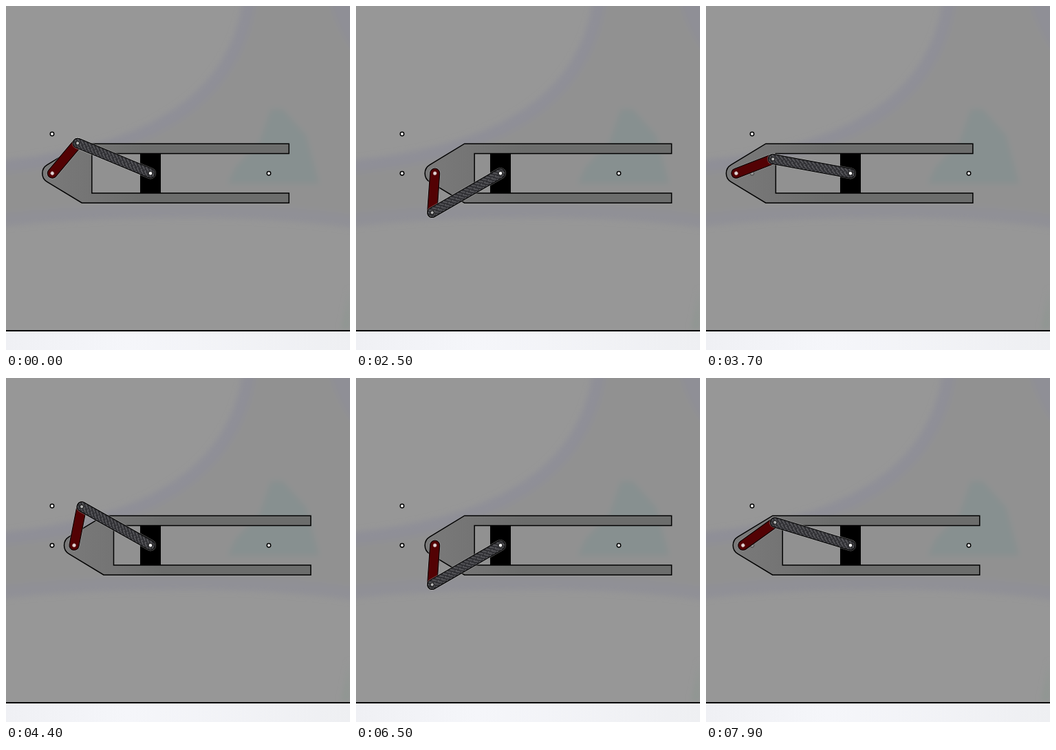
Recreate the animation shown at these times as an HTML page. Size 500 px wide and 500 px high, loop 8 s.

```html
<!DOCTYPE html>
<html lang="en">
<head>
<meta charset="utf-8">
<title>Slider crank</title>
<style>
  html, body { margin: 0; width: 100%; height: 100%; overflow: hidden; background: #979797; }
  svg { display: block; width: 100vw; height: 100vh; }
  .pin { fill: #fff; stroke: #000; stroke-width: 1.5; }
  .halo { fill: #e4e4e4; opacity: .45; }
</style>
</head>
<body>
<svg viewBox="0 0 500 500">
  <defs>
    <filter id="soft" x="-20%" y="-20%" width="140%" height="140%"><feGaussianBlur stdDeviation="4"/></filter>
    <linearGradient id="metal" gradientUnits="userSpaceOnUse" x1="-15" y1="0" x2="130" y2="0">
      <stop offset="0" stop-color="#7a7a7a"/>
      <stop offset=".5" stop-color="#747474"/>
      <stop offset="1" stop-color="#6c6d6c"/>
    </linearGradient>
    <linearGradient id="floor">
      <stop offset="0" stop-color="#eff0f4"/>
      <stop offset=".35" stop-color="#f5f6fa"/>
      <stop offset="1" stop-color="#eeeff2"/>
    </linearGradient>
    <pattern id="weave" width="6" height="6" patternUnits="userSpaceOnUse">
      <rect width="6" height="6" fill="#2f2f33"/>
      <path d="M0 2L2.5 4.5M3.5 0L6 2.5M3.5 5.5H5.5" stroke="#68686c" stroke-width="1.1"/>
    </pattern>
  </defs>

  <rect width="500" height="500" fill="#979797"/>
  <g filter="url(#soft)">
    <path d="M348 -20C335 110 240 208 -20 227V322C150 304 350 300 520 325V-20Z" fill="#919191"/>
    <path d="M355 -20C341 114 244 212 -20 235" fill="none" stroke="#8f8f97" stroke-width="19"/>
    <path d="M-20 313C120 295 380 291 520 316" fill="none" stroke="#909096" stroke-width="19"/>
    <path d="M470 -10H520V80Q485 50 470 -10" fill="#8f8f96"/>
    <path d="M385 150H402L436 188L455 258H322L335 232L368 200Z" fill="#879090"/>
    <path d="M500 410V470H488Z" fill="#8f9692"/>
  </g>
  <rect y="471" width="500" height="29" fill="url(#floor)"/>
  <path d="M0 472H500" stroke="#000" stroke-width="2"/>

  <g class="pin">
    <circle cx="67" cy="186" r="2.7"/>
    <circle cx="67" cy="243.2" r="2.7"/>
    <circle cx="382" cy="243.2" r="2.7"/>
  </g>

  <path id="frame" d="M-7.5 -12.4L43 -43H344V-28.7H57.5V28.7H344V43H43L-7.5 12.4A14.5 14.5 0 0 1 -7.5 -12.4Z"
        fill="url(#metal)" stroke="#000" stroke-width="1.5"/>
  <circle class="pin" cx="67" cy="243.2" r="2.7" opacity=".25"/>
  <rect x="195" y="214" width="30" height="58" fill="#000"/>

  <g id="crank">
    <rect class="halo" x="-8.2" y="-8.2" width="73.7" height="16.4" rx="8.2"/>
    <rect x="-7" y="-7" width="71.3" height="14" rx="7" fill="#530204" stroke="#120506" stroke-width="1.3"/>
    <circle r="2.5" fill="#e2d8d8" stroke="#a88" stroke-width=".6"/>
  </g>
  <g id="rod">
    <rect class="halo" x="-8.2" y="-8.2" width="131" height="16.4" rx="8.2"/>
    <rect x="-7" y="-7" width="128.6" height="14" rx="7" fill="url(#weave)" stroke="#0a0a0a" stroke-width="1.3"/>
    <circle r="2.6" fill="#b8b8b8" stroke="#222" stroke-width="1.2"/>
    <circle cx="114.6" r="2.8" fill="#fff" stroke="#222"/>
  </g>
</svg>
<script>
  const R = 57.3, L = 114.6, PX = 210, PY = 243.2;
  const STEP = 14.4, START = 50;
  // Five poses are spread unevenly over every eight ticks of 100 ms.
  const CADENCE = [0, 0, 1, 1, 2, 3, 4, 4];
  const frame = document.getElementById('frame');
  const crank = document.getElementById('crank');
  const rod = document.getElementById('rod');

  function place(el, x, y, deg = 0) {
    el.setAttribute('transform', `translate(${x} ${y}) rotate(${deg})`);
  }

  function draw(now) {
    const tick = Math.floor((now % 8000) / 100);
    const pose = Math.floor(tick / 8) * 5 + CADENCE[tick % 8];
    const deg = START + pose * STEP;
    const a = deg * Math.PI / 180;
    const h = R * Math.sin(a);
    const bx = PX - Math.sqrt(L * L - h * h);
    const ax = bx - R * Math.cos(a);
    place(frame, ax, PY);
    place(crank, ax, PY, -deg);
    place(rod, bx, PY - h, Math.asin(h / L) * 180 / Math.PI);
  }

  let t0;
  function loop(now) {
    t0 ??= now;
    draw(now - t0);
    requestAnimationFrame(loop);
  }
  draw(0);
  requestAnimationFrame(loop);
</script>
</body>
</html>
```
